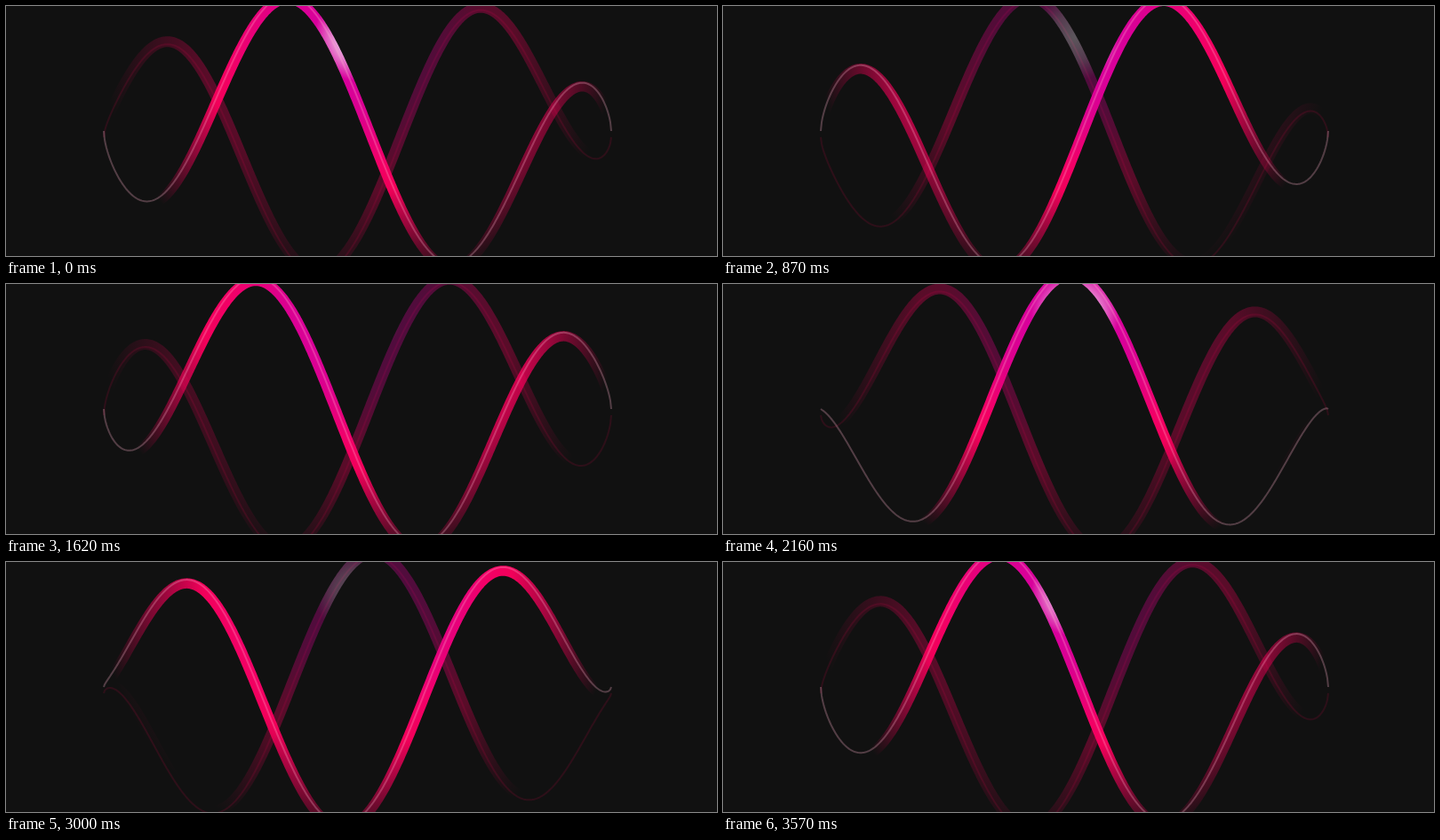
An HTML page with a canvas for the animation above (3600 ms loop, 800 px wide and 282 px high).

```html
<!DOCTYPE html>
<html lang="en">
<head>
<meta charset="utf-8">
<title>Glowing waves</title>
<style>
  html, body { margin: 0; height: 100%; overflow: hidden; background: #111; }
  canvas { display: block; }
</style>
</head>
<body>
<canvas id="stage" width="800" height="282"></canvas>
<script>
const ctx = document.getElementById('stage').getContext('2d');
const LOOP = 3600, LEFT = 110, RIGHT = 681, MIDDLE = 141;
const AMPLITUDE = 155, WAVELENGTH = 380, LAG = 35;
const K = 2 * Math.PI / WAVELENGTH;

const glow = ctx.createRadialGradient(396, 35, 0, 396, 35, 290);
[
  [0, 'rgba(250,235,250,1)'],
  [0.09, 'rgba(232,150,214,1)'],
  [0.17, 'rgba(216,0,156,1)'],
  [0.3, 'rgba(220,0,142,1)'],
  [0.5, 'rgba(242,0,102,1)'],
  [0.6, 'rgba(242,0,90,1)'],
  [1, 'rgba(230,0,80,0)']
].forEach(([at, color]) => glow.addColorStop(at, color));

// Pinched to zero at both ends, nearly flat in the middle
function envelope(x) {
  const v = Math.abs(2 * (x - LEFT) / (RIGHT - LEFT) - 1);
  return AMPLITUDE * Math.pow(1 - v ** 3, 0.6);
}

function drawWave(zero, sign, drop, width, style, alpha = 1) {
  ctx.beginPath();
  for (let x = LEFT; x <= RIGHT; x++) {
    ctx.lineTo(x, MIDDLE + drop + sign * envelope(x) * Math.sin(K * (x - zero)));
  }
  ctx.lineWidth = width;
  ctx.strokeStyle = style;
  ctx.globalAlpha = alpha;
  ctx.stroke();
}

function draw(time) {
  const zero = 410 + 2 * WAVELENGTH * (time % LOOP) / LOOP;
  ctx.globalAlpha = 1;
  ctx.fillStyle = '#111';
  ctx.fillRect(0, 0, 800, 282);
  drawWave(zero + LAG, -1, 7, 2, 'rgb(255,0,80)', 0.12);
  drawWave(zero + LAG, -1, 4, 12, glow, 0.32);
  drawWave(zero, 1, 4, 11.5, glow);
  drawWave(zero, 1, 0, 2, 'rgb(255,180,205)', 0.28);
}

const start = performance.now();
function tick() {
  draw(performance.now() - start);
  requestAnimationFrame(tick);
}
tick();
</script>
</body>
</html>
```
